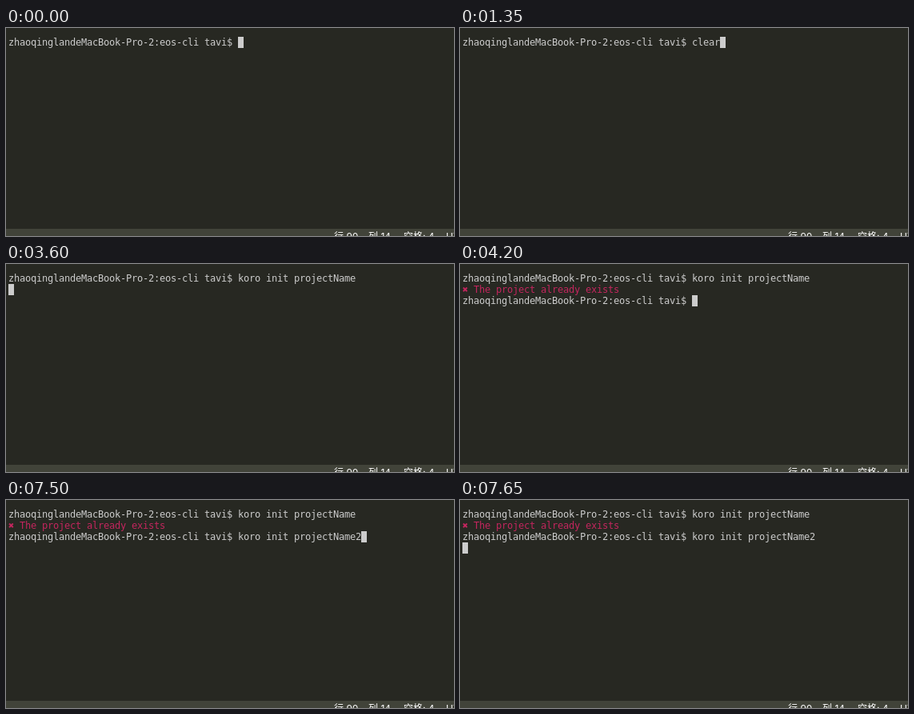
An HTML page that plays this animation: 560 by 260 pixels, repeating every 8000 ms.

```html
<!DOCTYPE html>
<html lang="zh">
<head>
<meta charset="utf-8">
<style>
  html, body { margin: 0; width: 100%; height: 100%; overflow: hidden; background: #272822; }
  #term {
    position: absolute; left: 3px; top: 11px; margin: 0; color: #ccc;
    font: 12px/14px "DejaVu Sans Mono", monospace;
    letter-spacing: calc(7px - 1ch); /* 7px cells */
    font-variant-ligatures: none;
  }
  .error { color: #c4265e; }
  .cursor { display: inline-block; width: 7px; height: 14px; background: #ccc; vertical-align: top; }
  svg { position: absolute; left: 0; top: 0; }
  text { font: 12px Inter, "Noto Sans CJK SC", "Noto Sans CJK", sans-serif; fill: #fff; white-space: pre; }
</style>
</head>
<body>
<pre id="term"></pre>
<svg width="560" height="260">
  <rect y="251" width="560" height="9" fill="#414339"/>
  <text x="410" y="265">行 90，</text>
  <text x="453" y="265">列 14</text>
  <text x="497" y="265">空格: 4</text>
  <text x="550" y="265">UTF-8</text>
</svg>
<script>
const LOOP = 8000;
const term = document.getElementById('term');
const prompt = 'zhaoqinglandeMacBook-Pro-2:eos-cli tavi$ ';
const command = 'koro init projectName';
const failed = `${prompt}${command}\n<span class="error">✖ The project already exists</span>\n${prompt}`;

// Screen contents before the cursor, by start time in ms
const screens = [
  [0, prompt],
  [1350, prompt + 'clear'],
  [1950, prompt + command],
  [3600, prompt + command + '\n'],
  [4200, failed],
  [6300, failed + command],
  [7500, failed + command + '2'],
  [7650, failed + command + '2\n'],
];

let shown;
function draw() {
  const t = performance.now() % LOOP;
  const [, screen] = screens.findLast(([start]) => start <= t);
  if (screen !== shown) {
    term.innerHTML = screen + '<span class="cursor"></span>';
    shown = screen;
  }
  requestAnimationFrame(draw);
}
draw();
</script>
</body>
</html>
```
